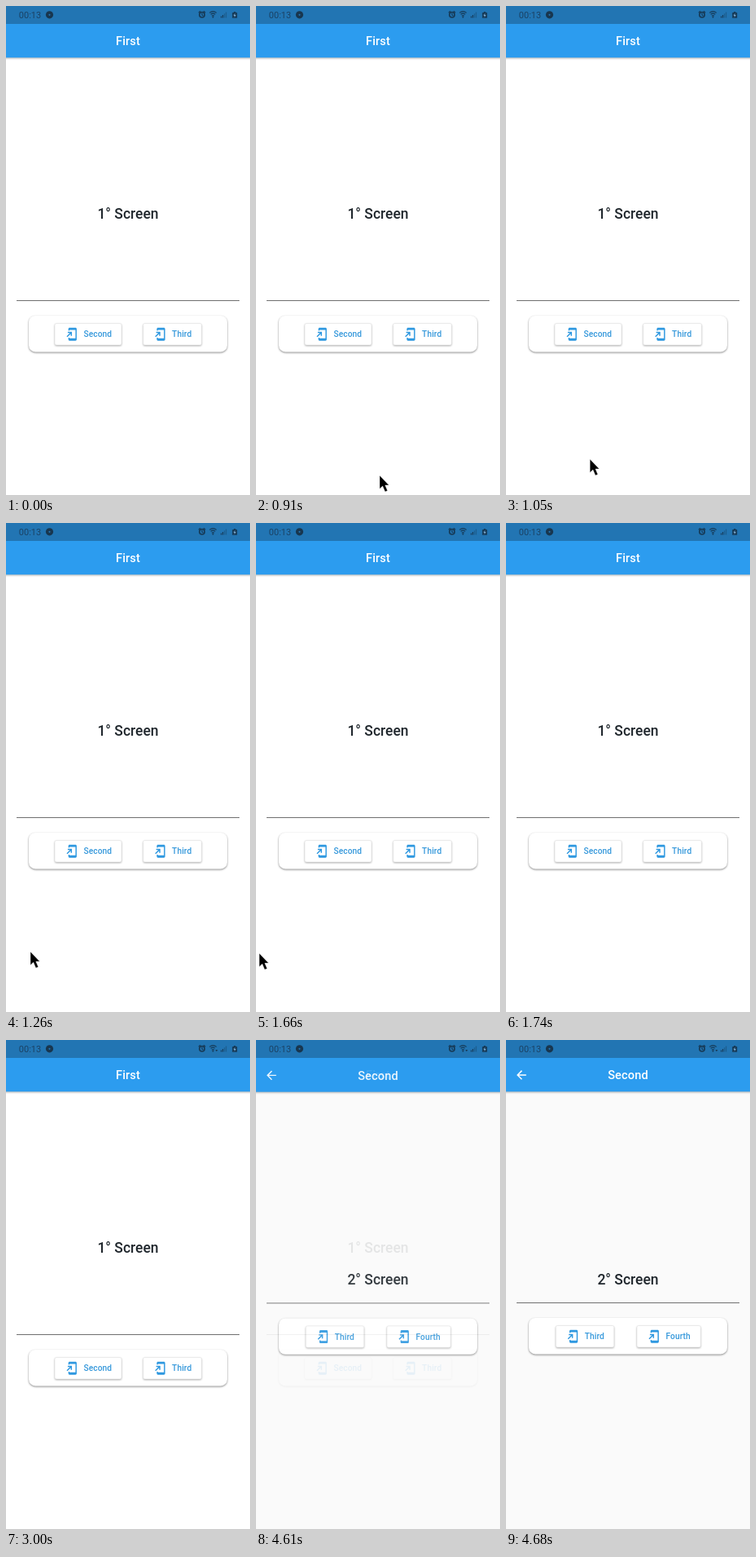
Write an HTML page that moves like this. It is 300 px wide and 600 px high and loops after 8 s.

```html
<!DOCTYPE html>
<html lang="en">
<head>
<meta charset="utf-8">
<title>Screen navigation</title>
<style>
  html, body { margin: 0; width: 100%; height: 100%; overflow: hidden; background: #fff; }
  svg { display: block; width: 100vw; height: 100vh; }
  text { font-family: Roboto, "Liberation Sans", sans-serif; font-weight: 500; }
  .title { font-size: 14.6px; letter-spacing: .11px; fill: #fff; text-anchor: middle; }
  .head { font-size: 17.5px; fill: #20272d; text-anchor: middle; }
  .label { font-size: 10.2px; letter-spacing: .1px; fill: #3598db; }
  .clock { font-size: 11px; font-weight: 400; fill: #1b4366; }
  .bar { filter: drop-shadow(0 1.2px 1.2px rgba(0, 0, 0, .3)); }
  .card { filter: drop-shadow(0 1.4px 1.1px rgba(0, 0, 0, .46)); }
  .button { filter: drop-shadow(0 1.3px 1.1px rgba(0, 0, 0, .36)); }
</style>
</head>
<body>
<svg viewBox="0 0 300 600" preserveAspectRatio="none">
  <defs>
    <path id="open" d="M18 1.01L8 1c-1.1 0-2 .9-2 2v3h2V5h10v14H8v-1H6v3c0 1.1.9 2 2 2h10c1.1 0 2-.9 2-2V3c0-1.1-.9-1.99-2-1.99zM10 15h2V8H5v2h3.59L3 15.59 4.41 17 10 11.41z"/>
    <path id="back" d="M20 11H7.83l5.59-5.59L12 4l-8 8 8 8 1.41-1.41L7.83 13H20z"/>
  </defs>
  <g id="first"></g>
  <g id="second"></g>

  <g id="status">
    <rect width="300" height="22" fill="#2275b3"/>
    <text class="clock" x="15.8" y="14.8">00:13</text>
    <circle cx="53.5" cy="10.8" r="4.6" fill="#18364f"/>
    <circle cx="53.5" cy="10.8" r="1.1" fill="#2275b3"/>
    <g fill="none" stroke="#173b58" stroke-width="1.2">
      <circle cx="241" cy="10.8" r="3.2" stroke-width="1.6"/>
      <path d="M236.8 8.2l2.3-2M245.2 8.2l-2.3-2M241 9v2l1.4 1"/>
      <path d="M250.2 8.4q4.3-3.4 8.6 0M251.7 10.3q2.8-2.2 5.6 0M253.1 12.2q1.4-1 2.8 0"/>
    </g>
    <circle cx="254.5" cy="13.7" r=".9" fill="#173b58"/>
    <g id="traffic">
      <rect x="256.6" y="9.4" width="4.2" height="5.4" fill="#2275b3"/>
      <path d="M257.4 12h3l-1.5 2.2z" fill="#173b58"/>
    </g>
    <g fill="#173b58">
      <path d="M264 12.5h1.2v2H264zM266 11h1.2v3.5H266z"/>
      <path d="M268 9.3h1.2v5.2H268zM270 7.5h1.2v7H270z" opacity=".4"/>
      <path d="M280 7h2.4v1h1.2q.6 0 .6.6v5.6q0 .6-.6.6h-4.8q-.6 0-.6-.6V8.600q0-.6.6-.6h1.200z"/>
    </g>
    <path d="M281.6 9l-2 2.800h1.400l-.3 2.200 2-2.900h-1.400z" fill="#8dbbe0"/>
  </g>

  <path id="cursor" d="M0 0V16.400L3.700 13.100 6.700 20 9.700 18.700 6.800 12H11.500z" fill="#000" stroke="#fff" stroke-width=".4"/>
</svg>
<script>
const LOOP = 8000;
const $ = id => document.getElementById(id);

function button(x, y, width, label) {
  return `<rect class="button" x="${x}" y="${y}" width="${width}" height="26.4" rx="2" fill="#fff"/>
    <rect x="${x}" y="${y}" width="${width}" height="26.4" rx="2" fill="none" stroke="#e2e2e2" stroke-width=".6"/>
    <use href="#open" transform="translate(${x + 12.3} ${y + 4.4}) scale(.73)" fill="#2e98e0"/>
    <text class="label" x="${x + 35.4}" y="${y + 16.9}">${label}</text>`;
}

function page({ title, head, headY, lineY, bg, buttons, back }) {
  const arrow = '<use href="#back" transform="translate(10.2 34.2) scale(.73)" fill="#fff"/>';
  return `<rect y="-2" width="300" height="604" fill="${bg}"/>
    <rect class="bar" x="-4" y="20" width="308" height="43.3" fill="#2c9cef"/>
    ${back ? arrow : ''}
    <text class="title" x="150" y="48.2">${title}</text>
    <text class="head" x="150" y="${headY}">${head}</text>
    <rect x="13" y="${lineY}" width="274" height="1" fill="#707070"/>
    <rect class="card" x="28" y="${lineY + 19}" width="244" height="44.4" rx="8" fill="#fff"/>
    ${buttons.map(([x, w, label]) => button(x, lineY + 28.5, w, label)).join('')}`;
}

$('first').innerHTML = page({
  title: 'First', head: '1° Screen', headY: 260.5, lineY: 361, bg: '#fff',
  buttons: [[60, 82, 'Second'], [168.700, 71.700, 'Third']]
});
$('second').innerHTML = page({
  title: 'Second', head: '2° Screen', headY: 300, lineY: 322, bg: '#fafafa', back: true,
  buttons: [[61.300, 71.500, 'Third'], [161, 78.300, 'Fourth']]
});

function cursorAt(t) {
  if (t < 910 || t >= 1740) return null;
  if (t >= 1660) return [4, 528];
  const k = Math.min(5, Math.floor((t - 910) / 70)) / 5;
  return [152 - 122 * k, 576 - 50 * k];
}

function show(id, on) {
  $(id).style.display = on ? '' : 'none';
}

function draw(t) {
  const pos = cursorAt(t);
  show('cursor', pos);
  if (pos) $('cursor').setAttribute('transform', `translate(${pos})`);

  show('traffic', t >= 3000);

  const settled = t >= 4680;
  show('second', t >= 4610);
  $('second').setAttribute('opacity', settled ? 1 : .9);
  $('second').setAttribute('transform', `translate(0 ${settled ? 0 : .4})`);
}

const start = performance.now();
function tick() {
  draw((performance.now() - start) % LOOP);
  requestAnimationFrame(tick);
}
tick();
</script>
</body>
</html>
```
